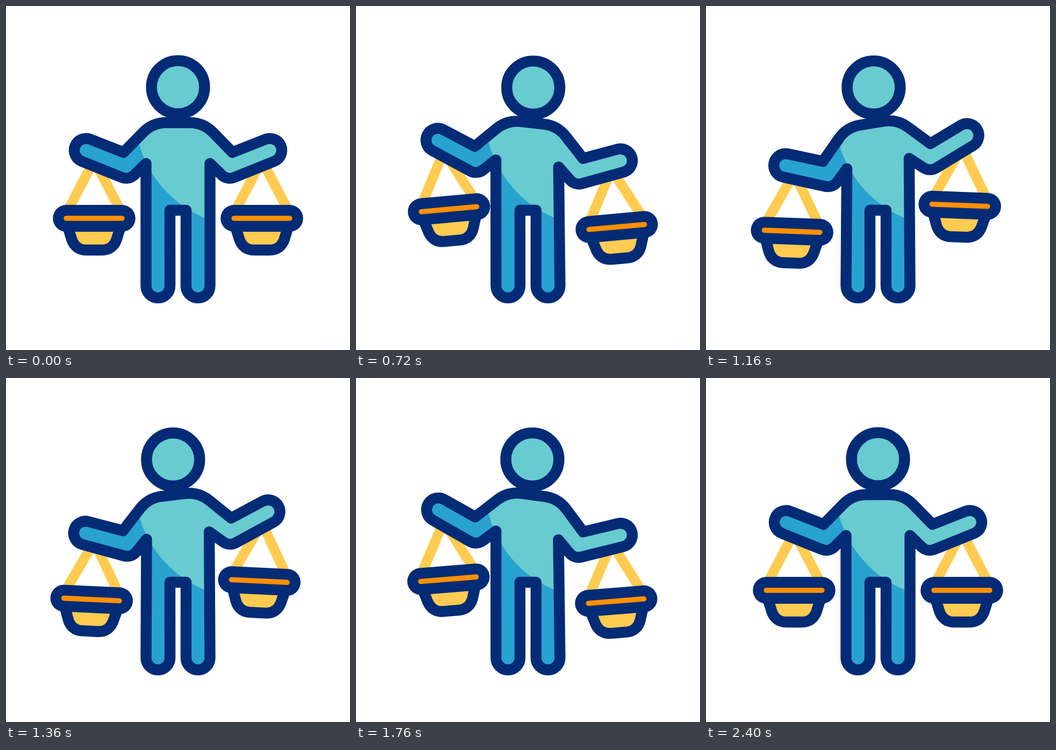
Animation of 640 by 640 pixels, one loop 2600 ms. Source, as an HTML page with a canvas:

```html
<!DOCTYPE html>
<html lang="en">
<head>
<meta charset="utf-8">
<title>Balance</title>
<style>
  html, body { margin: 0; width: 100%; height: 100%; overflow: hidden; background: #fff; }
  canvas { display: block; width: 640px; height: 640px; }
</style>
</head>
<body>
<canvas id="stage"></canvas>
<script>
const canvas = document.getElementById('stage');
const ctx = canvas.getContext('2d');
const ratio = window.devicePixelRatio || 1;
canvas.width = canvas.height = 640 * ratio;

const LOOP = 2600, STEP = 40, LINE = 20.4;
const NAVY = '#032b76', TEAL = '#68cbd0', BLUE = '#28a2ce', YELLOW = '#ffcb50', ORANGE = '#ff9000';
const rad = deg => deg * Math.PI / 180;

// Keys are [time, value] pairs, eased in and out between neighbours.
const LEAN = [[200, 0], [600, 8.1], [1200, -9.6], [1800, 8.1], [2400, 0]];
const NOD = [[260, 0], [680, 10], [1280, -10], [1880, 10], [2400, 0]];
const SWING = [[240, 0], [720, 5.2], [1280, -3.1], [1860, 5.2], [2400, 0]];

function track(keys, t) {
  if (t <= keys[0][0]) return keys[0][1];
  for (let i = 1; i < keys.length; i++) {
    const [t0, v0] = keys[i - 1], [t1, v1] = keys[i];
    if (t < t1) return v0 + (v1 - v0) * (1 - Math.cos(Math.PI * (t - t0) / (t1 - t0))) / 2;
  }
  return keys[keys.length - 1][1];
}

// The part above the armpits turns around the chest; the legs stay.
function bodyPath(lean) {
  const path = new Path2D();
  const a = rad(lean), c = Math.cos(a), s = Math.sin(a);
  const turn = (x, y) => {
    const dx = x - 320, dy = y - 288;
    return [320 + dx * c - dy * s, 288 + dx * s + dy * c];
  };
  const to = (x, y) => path.lineTo(...turn(x, y));
  const bend = (x, y, r, from, end) => path.arc(...turn(x, y), r, rad(from) + a, rad(end) + a);
  const leg = x => path.arc(x, 520.7, 22.3, 0, Math.PI);

  path.moveTo(305, 380);
  leg(282.8);
  to(260.5, 293);
  bend(223.5, 298.5, 22, 45, 112);
  bend(149, 268.5, 22, 112, 292);
  to(218.6, 272.3);
  bend(298, 277, 60, 225, 270);
  bend(342, 277, 60, 270, 315);
  to(421.4, 272.3);
  bend(491, 268.5, 22, 248, 428);
  bend(416.5, 298.5, 22, 68, 135);
  to(379.5 - Math.min(1.6, Math.abs(lean) * 0.6), 293);
  leg(357.2);
  path.lineTo(335, 380);
  path.closePath();
  return path;
}

function drawBody(lean) {
  const path = bodyPath(lean);
  ctx.fillStyle = TEAL;
  ctx.fill(path);
  ctx.save();
  ctx.clip(path);
  ctx.beginPath();
  ctx.rect(0, 0, 640, 640);
  ctx.arc(451, 199.3, 211.3, 0, 2 * Math.PI);
  ctx.fillStyle = BLUE;
  ctx.fill('evenodd');
  ctx.restore();
  ctx.strokeStyle = NAVY;
  ctx.lineWidth = LINE;
  ctx.stroke(path);
}

function drawHead(shift) {
  const reach = 64;
  ctx.beginPath();
  ctx.arc(320 + shift, 215 - Math.sqrt(reach * reach - shift * shift), 49.4, 0, 2 * Math.PI);
  ctx.fillStyle = TEAL;
  ctx.fill();
  ctx.strokeStyle = NAVY;
  ctx.lineWidth = LINE;
  ctx.stroke();
}

function line(points, width, color) {
  ctx.beginPath();
  points.forEach(p => ctx.lineTo(...p));
  ctx.lineWidth = width;
  ctx.strokeStyle = color;
  ctx.stroke();
}

// Run a drawing step inside a scale that hangs from (x, 295 + drop).
function hang(x, drop, swing, draw) {
  ctx.save();
  ctx.translate(x, 295 + drop);
  ctx.rotate(rad(-swing));
  draw();
  ctx.restore();
}

function cords() {
  line([[-54, 95], [0, -8], [54, 95]], 18.6, YELLOW);
}

function pan() {
  ctx.beginPath();
  ctx.moveTo(-48, 119);
  ctx.lineTo(-41.5, 140);
  ctx.bezierCurveTo(-37, 152, -28, 159, -15, 159);
  ctx.lineTo(15, 159);
  ctx.bezierCurveTo(28, 159, 37, 152, 41.5, 140);
  ctx.lineTo(48, 119);
  ctx.fillStyle = YELLOW;
  ctx.fill();
  ctx.strokeStyle = NAVY;
  ctx.lineWidth = LINE;
  ctx.stroke();
  line([[-51.8, 100], [51.8, 100]], 50, NAVY);
  line([[-51.8, 100], [51.8, 100]], 9.6, ORANGE);
}

function render(t) {
  const lean = track(LEAN, t), swing = track(SWING, t);
  const drop = 148 * Math.sin(rad(lean));
  const both = draw => {
    hang(164, -drop, swing, draw);
    hang(476, drop, swing, draw);
  };
  ctx.setTransform(ratio, 0, 0, ratio, 0, 0);
  ctx.fillStyle = '#fff';
  ctx.fillRect(0, 0, 640, 640);
  ctx.lineCap = ctx.lineJoin = 'round';
  both(cords);
  drawBody(lean);
  drawHead(track(NOD, t));
  both(pan);
}

const start = performance.now();
function tick() {
  const t = (performance.now() - start) % LOOP;
  render(Math.floor(t / STEP) * STEP);
  requestAnimationFrame(tick);
}
tick();
</script>
</body>
</html>
```
